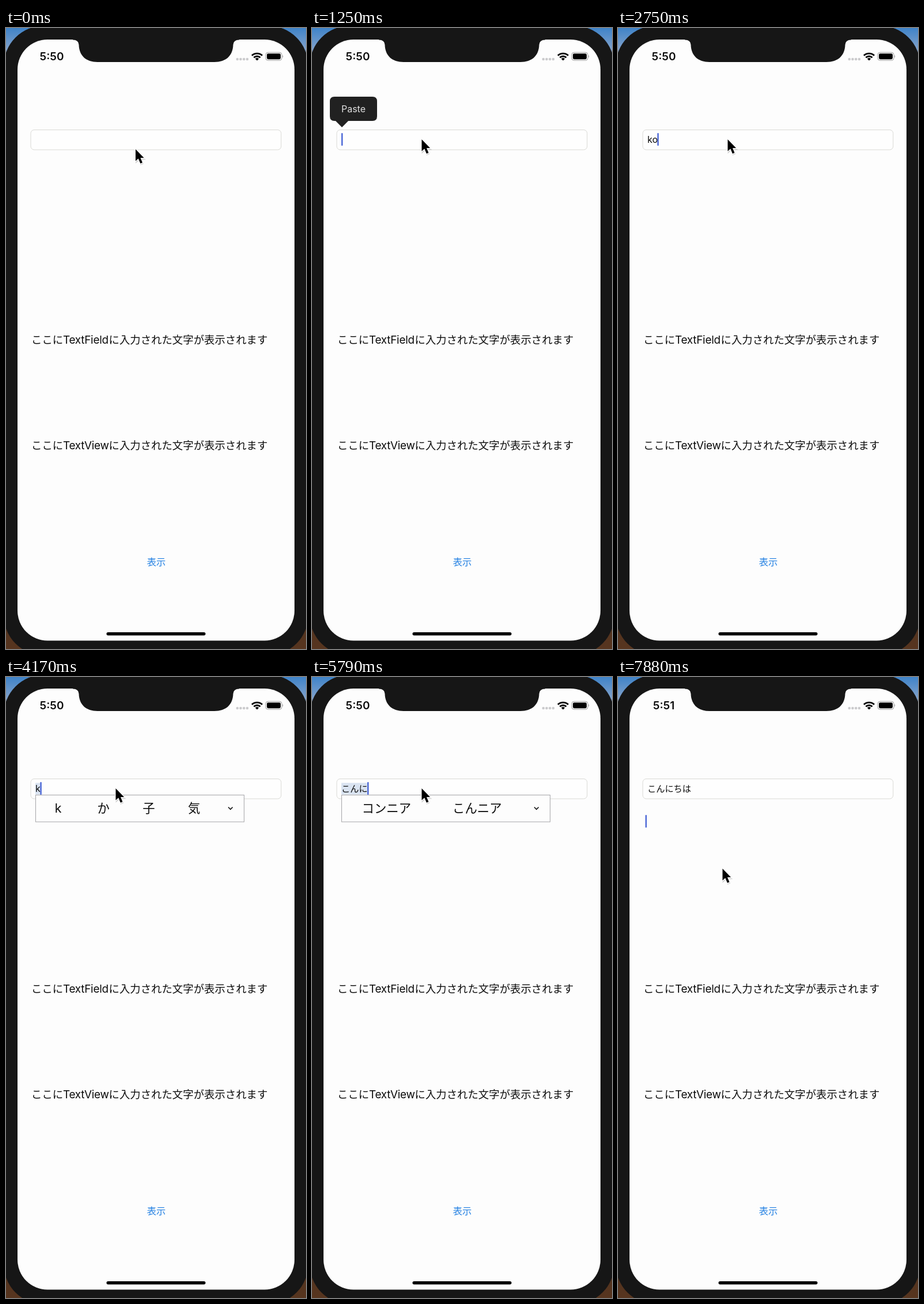
Recreate the animation shown at these times as an HTML page. Size 521x1076 px, loop 8000 ms.

```html
<!DOCTYPE html>
<html lang="ja">
<head>
<meta charset="utf-8">
<title>Text input</title>
<style>
html, body { margin: 0; width: 100%; height: 100%; overflow: hidden; background: #161616; }
svg { display: block; width: 100%; height: 100%; }
text { font-family: Inter, "Noto Sans CJK JP", "Noto Sans CJK", sans-serif; fill: #0c0c0c; white-space: pre; }
.label { font-size: 18.4px; }
.latin { font-size: 19px; letter-spacing: -.3px; }
.mid { text-anchor: middle; }
</style>
</head>
<body>
<svg viewBox="0 0 521 1076" preserveAspectRatio="none">
  <defs>
    <linearGradient id="desk" x1="0" y1="0" x2="0" y2="1">
      <stop offset="0" stop-color="#3f83c8"/>
      <stop offset=".04" stop-color="#8ba6cb"/>
      <stop offset=".5" stop-color="#222"/>
      <stop offset="1" stop-color="#57351f"/>
    </linearGradient>
  </defs>
  <rect width="521" height="1076" fill="url(#desk)"/>
  <rect x="-4" y="-4" width="529" height="1091" rx="70" fill="#161616"/>
  <rect x="20" y="20" width="481" height="1041.5" rx="52" fill="#fdfdfd"/>
  <path d="M116 19V20.5Q126 20.5 126.500 29C127 48 139 59 159 59H362C382 59 394 48 394.500 29Q395 20.500 405 20.500V19Z" fill="#161616"/>

  <text id="clock" class="mid" x="79.500" y="56" font-size="19" font-weight="600"></text>
  <g fill="#cbcbcd">
    <circle cx="401.800" cy="54" r="2.300"/><circle cx="407.500" cy="54" r="2.300"/>
    <circle cx="413.200" cy="54" r="2.300"/><circle cx="418.900" cy="54" r="2.300"/>
  </g>
  <g fill="none" stroke="#000" stroke-width="2.900">
    <path d="M427 47.800A12.800 12.800 0 0 1 445 47.800"/>
    <path d="M430.400 51.300A8 8 0 0 1 441.600 51.300"/>
    <path d="M436 56.500L432.800 53.300A4.600 4.600 0 0 1 439.200 53.300Z" fill="#000" stroke="none"/>
  </g>
  <rect x="451" y="42.300" width="28" height="13.800" rx="4" fill="none" stroke="#9a9a9a"/>
  <rect x="453" y="44.200" width="24" height="10" rx="2.400"/>
  <path d="M480.300 47Q482.300 49.200 480.300 51.500Z" fill="#9a9a9a"/>

  <rect x="43" y="176.500" width="434.800" height="34.500" rx="6" fill="#fefefe" stroke="#d9d9d5"/>
  <rect id="mark" x="51" y="183.500" height="20" fill="#d9e3f1"/>
  <text id="entry" x="51" y="199"></text>
  <rect id="caret" width="2.400" height="22" rx="1" fill="#4864d6"/>

  <g id="paste">
    <path d="M39 119H105Q113 119 113 127V153Q113 161 105 161H63L52 172L41 161H39Q31 161 31 153V127Q31 119 39 119Z" fill="#212121"/>
    <text class="mid" x="72" y="146" font-size="16" style="fill:#e0e0e0">Paste</text>
  </g>

  <g id="popup">
    <rect x="51.500" y="204.500" width="362" height="46.500" fill="#fdfdfd" stroke="#a5a5a8"/>
    <g id="choices" font-size="21.400"></g>
    <path d="M386 225.500L389.800 229.300L393.600 225.500" fill="none" stroke="#111" stroke-width="1.600"/>
  </g>

  <g id="labels"></g>
  <text class="mid" x="261" y="931" font-size="16.300" style="fill:#2380e2">表示</text>
  <rect x="174.500" y="1047" width="172" height="5.500" rx="2.750"/>

  <g id="pointer">
    <path d="M1 2V22.500L5.500 18.500L9 26.500L12.500 25L9.200 17.300H15.500Z" fill="#000" opacity=".16" stroke="#000" stroke-width="2"/>
    <path d="M0 0V20.500L4.800 16.300L8.400 24.800L12 23.300L8.500 15.100H14.600Z" stroke="#fff" stroke-width="2.600" paint-order="stroke"/>
  </g>
</svg>
<script>
const LOOP = 8000, LEFT = 51, KANA = 15.2, LATIN = 8.900;
const $ = id => document.getElementById(id);
const clamp = v => Math.max(0, Math.min(1, v));
const ramp = (t, a, b) => clamp((t - a) / (b - a));
const ease = p => p * p * (3 - 2 * p);
const set = (el, attrs) => { for (const k in attrs) el.setAttribute(k, attrs[k]); };
const show = (el, opacity) => set(el, { opacity, visibility: opacity > 0 ? "visible" : "hidden" });

// time, typed text, conversion candidates, start of the blink cycle
const steps = [
  [0, ""],
  [420, "", "", 300],
  [2120, "k"],
  [2320, "ko"],
  [2960, "k"],
  [3140, "", "", 3000],
  [4080, "k", "k か 子 気"],
  [4560, "こ", "こ 子 個 小"],
  [4840, "こn", "こn 子n 個n 小n"],
  [5100, "こん", "こん 今 紺 根"],
  [5300, "こんn", "コンn こんn"],
  [5420, "こんに", "コンニア こんニア"],
  [6080, "こんにt", "こんにt コンニt"],
  [6240, "こんにち", "こんにち 今日"],
  [6440, "こんにちh", "こんにちh 今日h"],
  [6600, "こんにちは", "こんにちは 今日は"],
  [6900, "こんにちは"]
];

// time, x, y of the pointer tip
const route = [[40, 225, 210], [210, 190.500, 193], [7000, 190.500, 193], [7360, 181.500, 332]];

function textWidth(s) {
  let w = 0;
  for (const c of s) w += c < "\u0100" ? LATIN : KANA;
  return w;
}

function blink(t) {
  const p = t % 880;
  return p < 500 ? 1 : p < 690 ? 1 - ramp(p, 500, 680) : ramp(p, 700, 880);
}

function pointerAt(t) {
  let [, x, y] = route[0];
  for (let i = 1; i < route.length; i++) {
    const [a, x0, y0] = route[i - 1], [b, x1, y1] = route[i];
    if (t < a) break;
    const p = ease(ramp(t, a, b));
    x = x0 + (x1 - x0) * p;
    y = y0 + (y1 - y0) * p;
  }
  return `translate(${x} ${y})`;
}

function choiceMarkup(list) {
  const words = list.split(" ");
  if (words.length > 2)
    return words.map((w, i) => `<text class="mid" x="${90.500 + i * 78.700}" y="235">${w}</text>`).join("");
  const second = words[1].length < 4 ? 264 : 244;
  return words.map((w, i) => `<text x="${i ? second : 86.500}" y="235">${w}</text>`).join("");
}

function label(kind, y) {
  return `<text class="label" x="44" y="${y}">ここに</text>` +
    `<text class="latin" x="99" y="${y}">${kind}</text>` +
    `<text class="label" x="178.500" y="${y}">に入力された文字が表示されます</text>`;
}

let shownList = null;

function draw(t) {
  const [, text, list = "", cycle] = steps.filter(s => s[0] <= t).pop();
  const width = textWidth(text);
  const inView = t >= 7480;

  $("clock").textContent = t < 6040 ? "5:50" : "5:51";
  $("entry").textContent = text;
  set($("entry"), { "font-size": /^[a-z]*$/.test(text) ? 16 : KANA });
  set($("mark"), { width: list ? width : 0 });

  const caretOn = t < 420 ? 0 : cycle ? blink(t - cycle) : 1;
  set($("caret"), inView ? { x: 47.500, y: 239 } : { x: LEFT + (width ? width - .5 : 0), y: 182 });
  show($("caret"), caretOn);

  show($("paste"), ramp(t, 1000, 1180) * (1 - ramp(t, 2080, 2240)));
  show($("popup"), list ? 1 : 0);
  if (list !== shownList) {
    $("choices").innerHTML = list ? choiceMarkup(list) : "";
    shownList = list;
  }
  set($("pointer"), { transform: pointerAt(t) });
}

$("labels").innerHTML = label("TextField", 546.500) + label("TextView", 729.500);

const start = performance.now();
function tick() {
  draw((performance.now() - start) % LOOP);
  requestAnimationFrame(tick);
}
tick();
</script>
</body>
</html>
```
